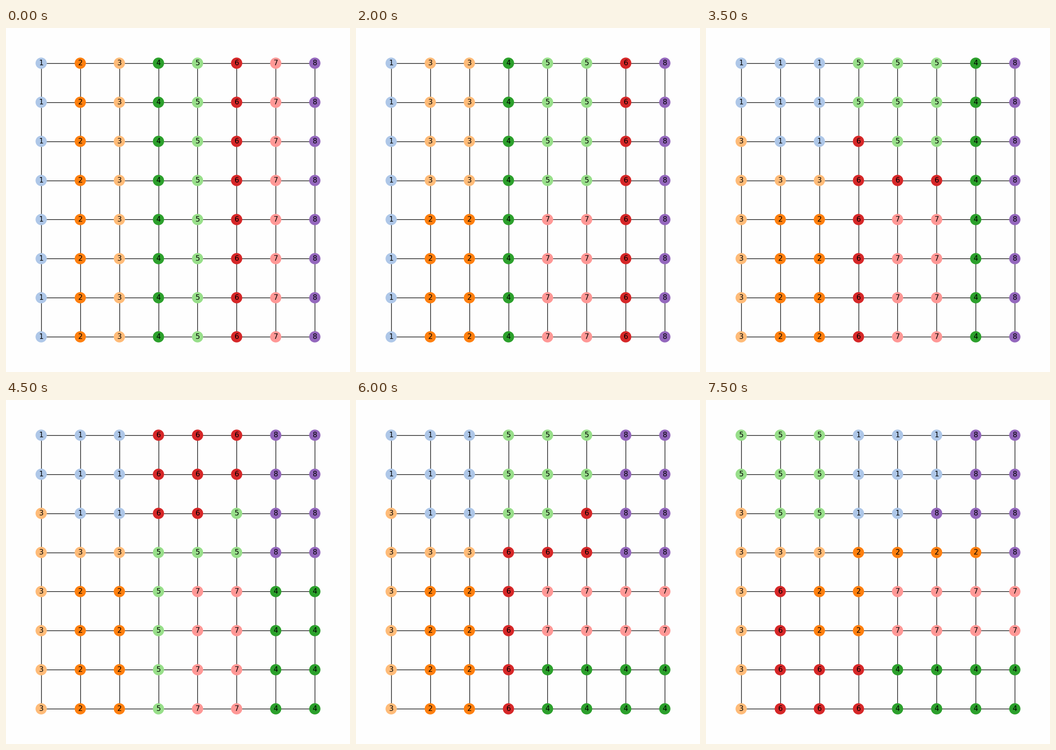
These frames come from a looping animation (748 by 748 pixels, 8000 ms). A matplotlib script:

```python
import numpy as np
import matplotlib.pyplot as plt
from matplotlib.animation import FuncAnimation
from matplotlib.collections import LineCollection

N = 8
UNITS = 800          # drawing units across the figure, 100 per inch
STEP_MS = 500
COLORS = np.array([plt.get_cmap("tab20")(i) for i in range(N + 1)])

# Ways to sweep over the cells of two merged districts
ORDERS = {
    "rows": lambda cell: (cell[0], cell[1]),
    "rows_from_right": lambda cell: (cell[0], -cell[1]),
    "columns": lambda cell: (cell[1], cell[0]),
    "bands_from_right": lambda cell: (cell[0] // 2, -cell[1]),
}

# Each step merges two districts; None leaves the plan as it is
MOVES = [
    (5, 6, "rows"), (3, 2, "rows"), None, (7, 6, "columns"),
    (5, 4, "rows_from_right"), (6, 4, "columns"), (1, 3, "rows_from_right"),
    (6, 5, "rows"), (8, 4, "rows"), None, (5, 6, "rows"), (7, 4, "rows"),
    (5, 1, "columns"), (2, 6, "bands_from_right"), (8, 2, "rows_from_right"),
]


def recombine(plan, first, second, order):
    """Merge two districts; the first N cells swept form the first one."""
    plan = plan.copy()
    cells = sorted(np.argwhere(np.isin(plan, (first, second))).tolist(),
                   key=ORDERS[order])
    for i, (row, col) in enumerate(cells):
        plan[row, col] = first if i < N else second
    return plan


plans = [np.tile(np.arange(1, N + 1), (N, 1))]
for move in MOVES:
    plans.append(recombine(plans[-1], *move) if move else plans[-1])

pos = UNITS * (np.arange(N) + 0.9) / (N + 0.8)
line_pos = np.floor(pos + 0.5) + 0.5
xs, ys = (a.ravel() for a in np.meshgrid(pos, pos))

fig = plt.figure(figsize=(8, 8), dpi=93.5, facecolor="#fefefe")
ax = fig.add_axes([0, 0, 1, 1])
ax.set(xlim=(0, UNITS), ylim=(UNITS, 0))
ax.axis("off")

start, end = pos[0], pos[-1]
edges = [[(start, p), (end, p)] for p in line_pos]
edges += [[(p, start), (p, end)] for p in line_pos]
ax.add_collection(LineCollection(edges, colors="black", linewidths=1,
                                 snap=False, zorder=1))
nodes = ax.scatter(xs, ys, s=300, c=COLORS[plans[0].ravel()],
                   linewidths=1.5, edgecolors="face", zorder=2)
labels = [ax.text(x, y, "", ha="center", va="center", fontsize=12,
                  family="DejaVu Sans", zorder=3) for x, y in zip(xs, ys)]


def update(step):
    plan = plans[step].ravel()
    nodes.set_facecolor(COLORS[plan])
    for label, district in zip(labels, plan):
        label.set_text(str(district))
    return [nodes, *labels]


anim = FuncAnimation(fig, update, frames=len(plans), interval=STEP_MS,
                     repeat=True, repeat_delay=0, blit=False)
plt.show()
```
